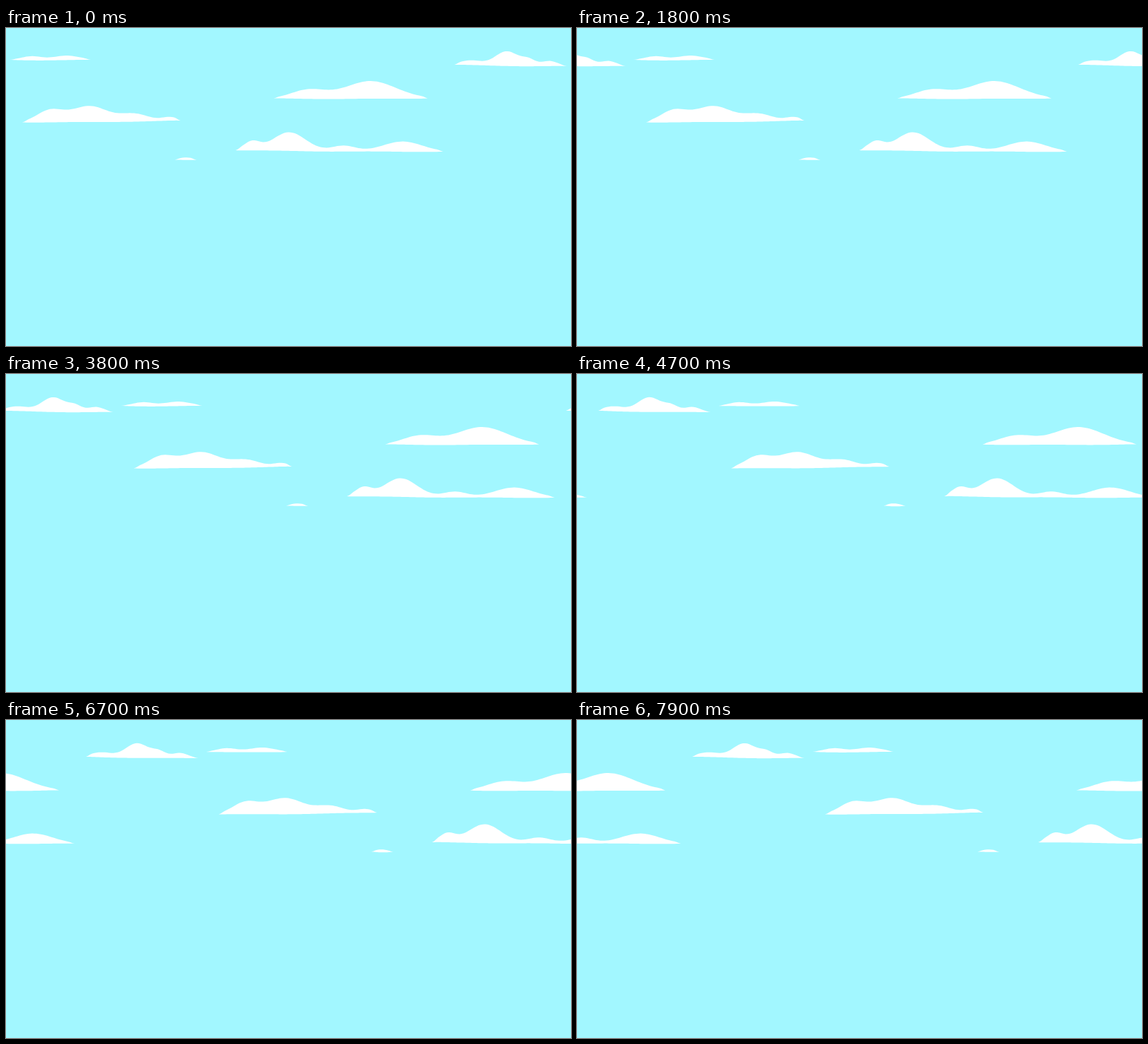
Recreate the animation shown at these times as an HTML page. Size 800 by 450 pixels, loop 8 s.

```html
<!DOCTYPE html>
<html lang="en">
<head>
<meta charset="utf-8">
<title>Drifting clouds</title>
<style>
  html, body { margin: 0; width: 100%; height: 100%; overflow: hidden; background: #a2f7ff; }
  svg { display: block; width: 100%; height: 100%; }
</style>
</head>
<body>
<svg viewBox="0 0 800 450">
  <rect width="800" height="450" fill="#a2f7ff"/>
  <g id="sky" fill="#fff">
    <path class="cloud"/>
    <path class="cloud" transform="translate(-800 0)"/>
  </g>
</svg>
<script>
const LOOP = 8000, STEP = 100;
const SPEED = 0.04152;      // px per ms
const WOBBLE = 254;         // ms for both drawings of the clouds

const hump = (x, height, spread) => ({ x, height, spread });
const cloud = (left, right, leftY, rightY, ...humps) => ({ left, right, leftY, rightY, humps });

const clouds = [
  cloud(5, 120, 45, 45, hump(36, 5, 20), hump(86, 6, 26)),
  cloud(635, 794, 52, 54, hump(658, 6.5, 22), hump(709, 20, 23), hump(740, 8, 14), hump(770, 7, 16)),
  cloud(379, 597, 99.7, 99.5, hump(428, 12, 34), hump(516, 24.5, 51)),
  cloud(23, 247, 133.5, 131, hump(62, 16, 26), hump(118, 22, 37), hump(182, 10, 28), hump(232, 5, 16)),
  cloud(325, 619, 173, 175, hump(348, 12, 16), hump(401, 26, 33), hump(478, 7.5, 23), hump(562, 14, 39)),
  cloud(239, 270, 186.3, 186.5, hump(255, 3.2, 14))
];

// Humps stand on a line between both tips; the base sags below it with a slight wave.
function cloudPath({ left, right, leftY, rightY, humps }, drawing) {
  const width = right - left;
  const count = Math.ceil(width / 3);
  const top = [], base = [];
  for (let i = 0; i <= count; i++) {
    const u = i / count, x = left + u * width;
    const line = leftY + u * (rightY - leftY);
    const taper = Math.min(1, (x - left) / 7, (right - x) / 7);
    const height = humps.reduce((sum, h) =>
      sum + h.height * Math.exp(-(((x - h.x + 1.5 * drawing) / h.spread) ** 2)), 0);
    const wave = 0.3 * Math.sin(x / 22 + 2 * drawing) * taper;
    const sag = 0.7 * Math.sin(Math.PI * u);
    top.push([x, line - height * taper]);
    base.unshift([x, line + sag + wave]);
  }
  return `M${top.concat(base).map(p => p.map(v => v.toFixed(2))).join('L')}Z`;
}

const drawings = [0, 1].map(n => clouds.map(c => cloudPath(c, n)).join(''));
const sky = document.getElementById('sky');
const copies = sky.querySelectorAll('.cloud');

function render(now) {
  const t = Math.floor((now % LOOP) / STEP) * STEP;
  const phase = (t / WOBBLE + 0.24) % 1;
  const d = drawings[phase < 0.5 ? 0 : 1];
  copies.forEach(copy => copy.setAttribute('d', d));
  sky.setAttribute('transform', `translate(${(t * SPEED).toFixed(2)} 0)`);
}

const start = performance.now();
function tick() {
  render(performance.now() - start);
  requestAnimationFrame(tick);
}
tick();
</script>
</body>
</html>
```
